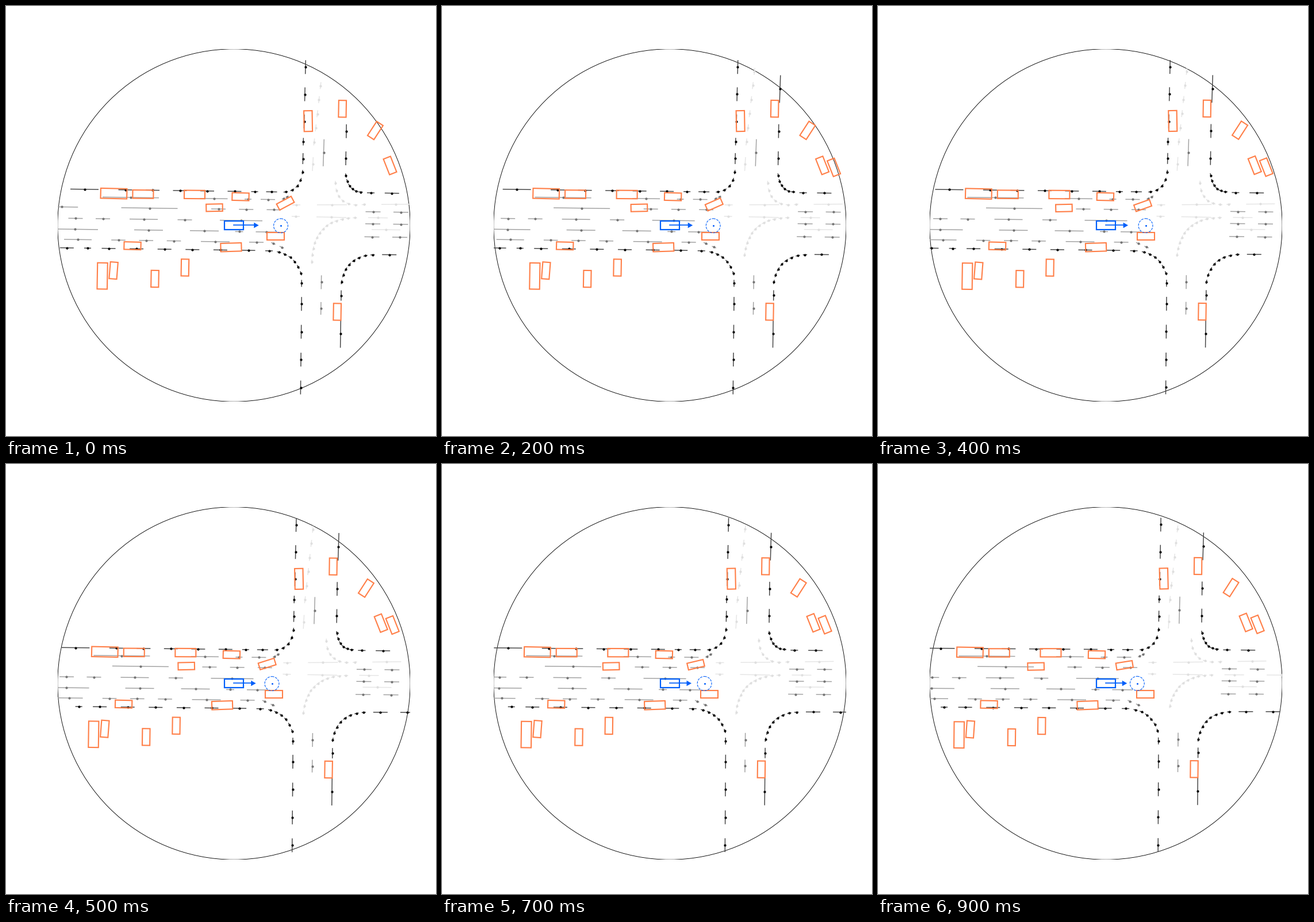
A matplotlib script that plays this animation: 748x748 px, repeating every 1 s.

```python
import matplotlib.pyplot as plt
import numpy as np
from matplotlib.animation import FuncAnimation
from matplotlib.collections import LineCollection, PolyCollection
from matplotlib.patches import Circle, Polygon

SIZE, DPI, FRAMES = 748, 100, 10
PT = 72 / DPI
CENTER = np.array([396.44, 381.48])
RADIUS = 306.68
CORAL, BLUE = "#ff7f48", "#005ffa"
FAINT_LIMIT = 33
WEST_SLOPE = 0.0138
CAR, VAN, BUS = (29.2, 13.2), (36, 14.4), (45.6, 17.5)


def posts(points, directions, half):
    """Rows of x, y and the vector from a post to the end of its dash."""
    unit = directions / np.hypot(*directions.T)[:, None]
    return np.hstack([points, unit * np.reshape(half, (-1, 1))])


def line(start, end, count, half, last_half=None):
    points = np.linspace(start, end, count)
    directions = np.tile(np.subtract(end, start), (count, 1))
    halves = np.linspace(half, last_half or half, count)
    return posts(points, directions, halves)


def west(level, start, end, count, half, last_half=None):
    """Posts on the west road; level is the lane's height at the car."""
    def at(x):
        return x, level + WEST_SLOPE * (x - CENTER[0])
    return line(at(start), at(end), count, half, last_half)


def bend(start, control, end, count, half=3.7):
    start, control, end = map(np.array, (start, control, end))
    u = np.linspace(0, 1, count)[:, None]
    points = (1 - u) ** 2 * start + 2 * u * (1 - u) * control + u ** 2 * end
    return posts(points, (1 - u) * (control - start) + u * (end - control), half)


def road_edges():
    return np.vstack([
        west(322.4, 136.5, 160, 1, 24.5),
        west(322.4, 207.5, 397.5, 5, 12),
        west(322.4, 432.5, 462, 2, 6, 9.5),
        bend((486.5, 323.3), (511.9, 319.8), (515.7, 289), 5),
        line((516.5, 265.5), (517.2, 236), 2, 9.5, 6.5),
        line((518.7, 200.8), (521, 106.3), 3, 12),

        west(424.7, 105.8, 142, 2, 12, 6),
        west(424.7, 178.5, 421.5, 6, 12),
        west(425, 457.5, 475, 1, 6.5),
        bend((475, 428.3), (503, 435.1), (513, 465), 6),
        line((514.2, 482.5), (514.1, 518), 1, 6),
        line((514.1, 518.2), (512.5, 663.6), 4, 12),

        line((594.5, 144.6), (592, 217.8), 1, 24),
        line((592, 217.8), (591.2, 265), 2, 12),
        bend((591.3, 295), (595.9, 322), (617, 323.5), 6),
        line((634.5, 325), (671.3, 325.6), 2, 6.5, 12.5),

        line((713.8, 433), (666.7, 432.6), 2, 12.5),
        bend((637.7, 432.8), (591.3, 435.4), (583.7, 480.3), 8),
        line((583, 503.6), (582, 570.5), 2, 9, 24)])


def lane_centers():
    east = [line((x, y), (x + 48.5, y + 0.7), 2, 13)
            for x, y in [(638.5, 358), (638, 379), (636.5, 401.6)]]
    return np.vstack(east + [
        west(335.5, 217, 361.5, 2, 49, 24),
        west(335.7, 421, 455.5, 2, 6, 12.5),
        line((482.5, 335), (489, 331.7), 2, 3),
        west(353.6, 97.2, 249.5, 2, 28, 49),
        west(353.5, 369.5, 466, 3, 12.5),
        west(373.2, 121, 168.5, 2, 12.5),
        west(373.1, 239.5, 311, 2, 24.5, 12.5),
        west(373, 409, 446, 1, 37),
        west(392.2, 120, 160, 1, 40),
        west(391.8, 248, 345, 2, 25),
        west(392.3, 405.5, 452.5, 2, 7, 18),
        west(410, 125, 150, 1, 24),
        west(410, 195.5, 292, 3, 12.3),
        west(410.4, 364, 435.5, 2, 25, 12.5),
        line((465, 413), (479.5, 419.5), 2, 4),
        line((552.5, 255.3), (551.7, 278.8), 1, 23.5),
        line((548.5, 480.5), (547.8, 526), 2, 12, 11)])


def crossing_lanes():
    return np.vstack([
        line((550, 114), (536, 236.5), 6, 6),
        line((533.7, 275), (533, 287), 1, 12),
        bend((573, 308), (575.2, 351.4), (622.5, 345.2), 7),
        line((505, 346), (567, 345.8), 2, 7, 26),
        line((678, 345), (703, 344.8), 1, 25),
        line((504, 366), (566, 367.4), 2, 7, 26),
        line((647, 368.4), (729.5, 369.5), 2, 17, 26),
        line((661, 389.2), (686, 389.5), 1, 25),
        bend((607, 368.4), (533.5, 369.3), (532, 445), 13)])


def parked(size, heading, *spots):
    return [(spot, size, heading) for spot in spots]


PARKED = [
    *parked(BUS, 1.4, (187.5, 326.2)),
    *parked(BUS, 91, (167.6, 469.6)),
    *parked(VAN, 0.5, (238.4, 327.4), (328, 327.9)),
    *parked(VAN, -1.7, (391.5, 419.7)),
    *parked(VAN, 89, (525.6, 200.2)),
    *parked(CAR, 1.5, (408, 331.7), (220, 417.1)),
    *parked(CAR, 91, (259, 474.5), (311.4, 455), (585.2, 178.8), (576.2, 532)),
    *parked(CAR, 94.5, (187.1, 460.1)),
    *parked(CAR, -57, (642.4, 216.6)),
    *parked(CAR, 68.5, (668, 277.5), (688, 280.9))]


def turn_at(t):
    return (0.157 * t + 0.0294 * t * t) / 557


def to_view(points, t):
    """World points as seen from the driving car."""
    a = turn_at(t)
    rotation = np.array([[np.cos(a), -np.sin(a)], [np.sin(a), np.cos(a)]])
    shift = np.array([3.2 * t - 0.02 * t * t, 0])
    return (np.asarray(points) - CENTER) @ rotation + CENTER - shift


def in_range(points):
    return np.hypot(*(points - CENTER).T) < RADIUS


def box(center, size, degrees=0):
    a = np.radians(degrees)
    along = np.array([np.cos(a), np.sin(a)]) * size[0] / 2
    across = np.array([-np.sin(a), np.cos(a)]) * size[1] / 2
    return np.array(center) + [along + across, along - across,
                               -along - across, -along + across]


def moving_cars(t):
    return [box((362.5 - 9.76 * t, 350.8 + 0.155 * t), (28.5, 12.6), -1.2),
            box((486 - 6.36 * t, 343 + 1.2 * t - 0.045 * t * t), (28.7, 11.8),
                -28 + 2.1 * t),
            box((469 - t + 0.06 * t * t, 400.7), (30, 13.3))]


class PostLayer:
    """Dots, each with a dash through it."""

    def __init__(self, ax, rows, dot_color, dash_color, limit=None):
        self.points, self.arms = rows[:, :2], rows[:, 2:]
        self.limit = limit
        self.dashes = ax.add_collection(
            LineCollection([], colors=dash_color, linewidths=1.5 * PT, zorder=2))
        self.dots = ax.scatter([], [], s=(4.2 * PT) ** 2, c=dot_color,
                               linewidths=0, zorder=3)

    def update(self, t):
        dots = to_view(self.points, t)
        shown = np.flatnonzero(in_range(dots))[:self.limit]
        ends = [to_view(self.points + side * self.arms, t)[shown] for side in (-1, 1)]
        self.dashes.set_segments(np.stack(ends, axis=1))
        self.dots.set_offsets(dots[shown])


fig = plt.figure(figsize=(SIZE / DPI, SIZE / DPI), dpi=DPI, facecolor="white")
ax = fig.add_axes([0.12, 0.08, 0.82, 0.82])
ax.set_xlim(CENTER[0] - RADIUS, CENTER[0] + RADIUS)
ax.set_ylim(CENTER[1] + RADIUS, CENTER[1] - RADIUS)
ax.axis("off")

ax.add_patch(Circle(CENTER, RADIUS, fill=False, ec="black", lw=0.9 * PT))
layers = [PostLayer(ax, crossing_lanes(), "#dfdfdf", "#e6e6e6", FAINT_LIMIT),
          PostLayer(ax, lane_centers(), "#757575", "#a3a3a3"),
          PostLayer(ax, road_edges(), "black", "#484848")]
cars = ax.add_collection(PolyCollection([], facecolors="none", edgecolors=CORAL,
                                        linewidths=2.1 * PT, joinstyle="miter",
                                        zorder=4))

ax.add_patch(Polygon(box(CENTER, (33, 15)), fill=False, ec=BLUE, lw=2.2 * PT, zorder=5))
shaft, = ax.plot([], [], color=BLUE, lw=1.7 * PT, zorder=6)
head = ax.add_patch(Polygon(np.zeros((3, 2)), fc=BLUE, lw=0, zorder=6))
goal = ax.add_patch(Circle((0, 0), 12.4, fill=False, ec=BLUE, lw=1.1 * PT,
                           ls="--", zorder=5))
goal_dot = ax.scatter([], [], s=(3 * PT) ** 2, c=BLUE, linewidths=0, zorder=5)


def draw(t):
    for layer in layers:
        layer.update(t)

    spots = to_view([spot for spot, _, _ in PARKED], t)
    turn = np.degrees(turn_at(t))
    still = [box(spot, size, heading - turn)
             for spot, (_, size, heading), shown
             in zip(spots, PARKED, in_range(spots)) if shown]
    cars.set_verts(still + moving_cars(t))

    x, y = CENTER
    tip = x + 40 - 0.35 * t + 3.3 * np.exp(-t)
    shaft.set_data([x, tip - 6], [y, y])
    head.set_xy([(tip, y), (tip - 8.5, y - 4.8), (tip - 8.5, y + 4.8)])

    target = to_view([(478, 382.3)], t)
    goal.center = target[0]
    goal_dot.set_offsets(target)
    return []


anim = FuncAnimation(fig, draw, frames=FRAMES, interval=100, repeat=True,
                     repeat_delay=0, blit=False)
plt.show()
```
